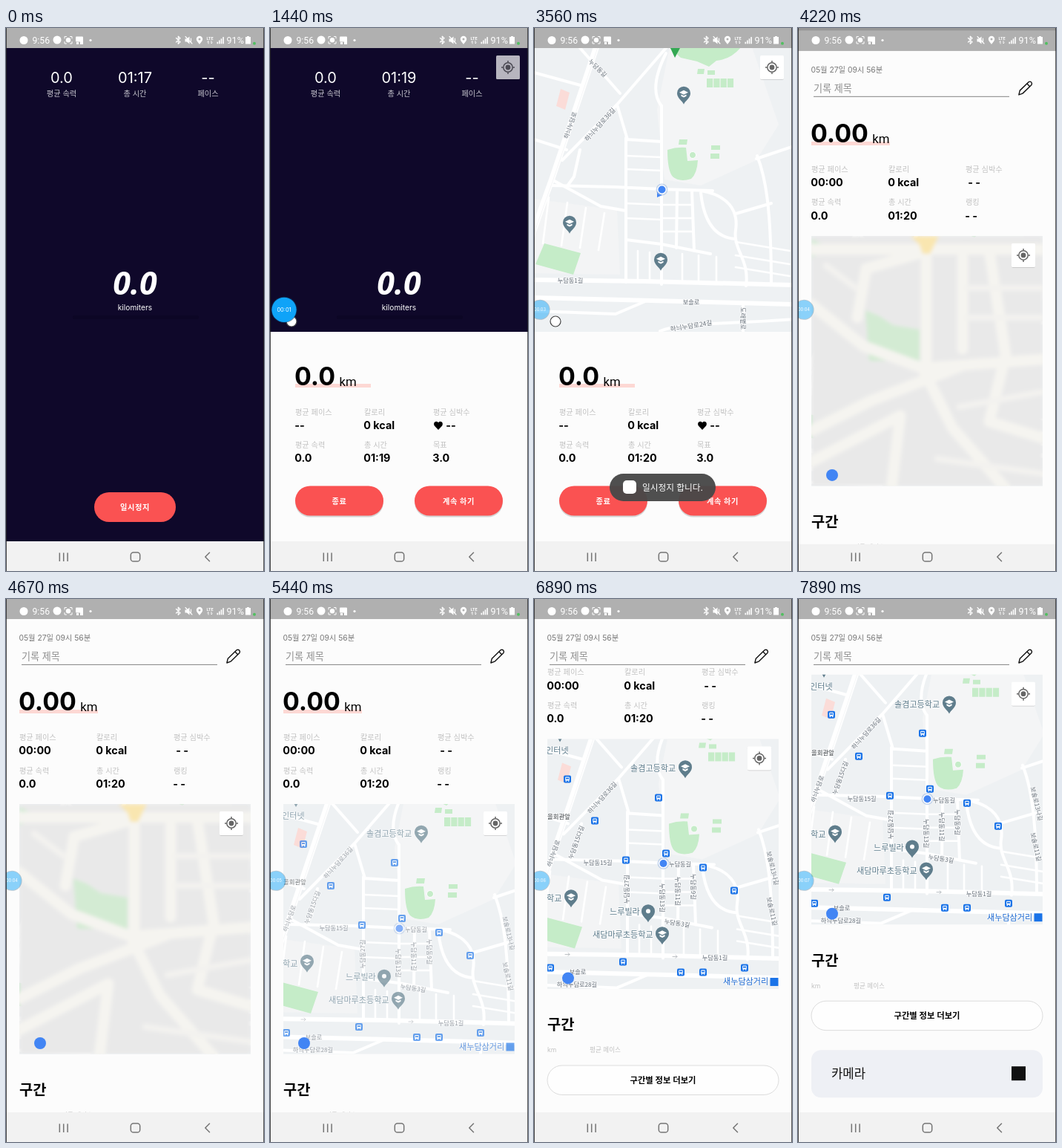
Recreate the animation shown at these times as an HTML page. Size 348 px wide and 731 px high, loop 8000 ms.

```html
<!DOCTYPE html>
<html lang="ko">
<head>
<meta charset="utf-8">
<title>Running tracker</title>
<style>
html, body { margin: 0; width: 100%; height: 100%; overflow: hidden; background: #fcfcfc; }
#stage { display: block; font-family: Inter, "Noto Sans CJK KR", "Noto Sans CJK", sans-serif; }
.sys { font-family: Roboto, sans-serif; }
.big { font-family: "Noto Sans", sans-serif; }
.map text { font-family: "Noto Sans CJK KR", "Noto Sans CJK", sans-serif; paint-order: stroke; stroke: #f8f9fa; stroke-width: 2px; stroke-linejoin: round; }
</style>
</head>
<body>
<svg id="stage" width="348" height="731" viewBox="0 0 348 731"></svg>
<script>
const LOOP = 8000;

const rect = (x, y, w, h, fill, rx = 0, more = '') =>
  `<rect x="${x}" y="${y}" width="${w}" height="${h}" rx="${rx}" fill="${fill}" ${more}/>`;
const dot = (x, y, r, fill, more = '') => `<circle cx="${x}" cy="${y}" r="${r}" fill="${fill}" ${more}/>`;
const line = (d, stroke, w, more = 'stroke-linecap="round"') =>
  `<path d="${d}" fill="none" stroke="${stroke}" stroke-width="${w}" stroke-linejoin="round" ${more}/>`;
const fill = (d, color) => `<path d="${d}" fill="${color}"/>`;
const text = (x, y, s, size, color, more = '') =>
  `<text x="${x}" y="${y}" font-size="${size}" fill="${color}" ${more}>${s}</text>`;
const mid = (x, y, s, size, color, more = '') => text(x, y, s, size, color, 'text-anchor="middle" ' + more);
const bold = 'font-weight="700"', semi = 'font-weight="600"', butt = 'stroke-linecap="butt"';

// label / value pair
const stat = (x, y, label, value, id = '', vx = x) =>
  text(x, y, label, 10.2, '#c2c2c2') +
  text(vx - .8, y + 19.3, value, 14.4, '#000', bold + (id && ` class="${id}"`));

const distance = (x, y, value, kx) =>
  text(x - 1, y, value, 33.9, '#000', bold) + text(kx, y + 1.3, 'km', 16.8, '#000', 'class="sys"');

const pill = (x, y, w, label) =>
  rect(x, y, w, 40, '#fa5252', 20) + mid(x + w / 2, y + 24, label, 10.2, '#fff', semi + ' letter-spacing=".6"');

const locate = (x, y, id) =>
  `<g id="${id}" transform="translate(${x} ${y})">` +
  rect(-16, -15.2, 32, 32, '#000', 2, 'opacity=".18"') + rect(-16, -16, 32, 32, '#fff', 1.5) +
  dot(0, 0, 6.2, 'none', 'stroke="#666" stroke-width="1.5"') + dot(0, 0, 3.4, '#666') +
  line('M0 -9V-6.5M0 9V6.5M-9 0H-6.5M9 0H6.5', '#666', 1.5, butt) + '</g>';

// ---- map ----
const GREEN = '#c5ecc8', SLATE = '#5f7d8c', STREET = '#69727b';

const alleys = [172, 190, 236, 256].map(y => `M124 ${y}L172 ${y + 2}`).join('') +
  [140, 156, 200, 222, 246].map((x, i) => `M${x} ${300 + i * 2}V342`).join('') +
  [20, 45, 70, 95].map((x, i) => `M${x} ${228 + i * 7}l-8 ${62 - i * 4}`).join('') +
  [238, 256, 274].map(y => `M174 ${y}H214`).join('') +
  [300, 318, 334].map(y => `M272 ${y - 12}L345 ${y}`).join('');

const base =
  rect(0, 20, 348, 400, '#eef1f3') +
  fill('M184 20L292 20L330 130L300 178L225 212L176 204L166 110Z', '#f4f5f6') +
  fill('M0 230L112 245L116 332L0 330Z', '#f3f4f5') +
  fill('M36 82L48 87L42 110L30 105Z', '#fbdcd8') +
  fill('M182 26H279Q266 42 246 44L236 52L220 45L198 40Z', GREEN) +
  fill('M180 164Q192 160 205 161L207 179L221 178Q220 196 212 203Q196 208 187 200Q180 192 180 164Z', GREEN) +
  dot(214, 171, 4.5, GREEN, 'stroke="#fff"') +
  fill('M196 150h11l-1 7h-11zM239 158h12v6h-12zM238 169h12v7h-12zM221 55h9l-1 7h-9zM234 57h10v6h-10z', GREEN) +
  [0, 1, 2, 3].map(i => rect(233 + i * 9.3, 68, 8.2, 12, GREEN)).join('') +
  fill('M14 290L63 303L53 332L2 318Z', GREEN) +
  line(alleys, '#fff', 2.6) +
  line('M56 20L116 88M38 178L112 103L184 20M112 103L126 150L172 153M24 212L110 214L172 217L241 219' +
    'M124 148V342M172 105V345M193 219L192 296M213 219L216 300M124 285L172 291L238 304', '#fff', 4) +
  line('M225 219C262 225 276 246 272 272S291 312 286 347M225 222C228 250 238 282 272 284M301 172C312 200 320 240 320 346' +
    'M272 250L320 236M300 176L348 160M282 370V410M170 408C200 396 240 400 350 392M0 381L110 385L150 368' +
    'M62 164L54 200L44 214M0 150L44 164M0 60L66 78M24 204L90 240L124 246M172 105C160 90 162 66 178 34', '#fff', 4) +
  line('M86 20L49 130L24 204L-5 285', '#fff', 8) +
  line('M-5 339L150 341L350 346M-5 363L120 366L350 372', '#fff', 6) +
  line('M88 20L51 130L26 204L-3 285', '#f3f4f5', .8);

const pin = (x, y, cap = true) => `<g transform="translate(${x} ${y + .7})">` +
  fill('M0 14C-2 9 -9 6 -9 -1A9 9 0 0 1 9 -1C9 6 2 9 0 14Z', SLATE) +
  (cap ? fill('M-6 -2L0 -5L6 -2L0 1ZM-3.5 .7L0 2.5L3.5 .7V3L0 4.8L-3.5 3Z', '#fff') : dot(0, -1, 3, '#fff')) + '</g>';
const pins = pin(202, 88) + pin(48, 262) + pin(171, 312);
const here = dot(172.5, 217.5, 8, '#9db8e0', 'opacity=".55"') + dot(172.5, 217.5, 6.4, '#fff') + dot(172.5, 217.5, 5, '#4285f4');
const road = (x, y, s, a = 0, size = 8.2) =>
  `<g transform="translate(${x} ${y}) rotate(${a})">${mid(0, 3, s, size, STREET)}</g>`;
const place = (x, y, s, color = SLATE) => text(x, y, s, 11.1, color);
const stop = ([x, y]) => `<g transform="translate(${x} ${y})">` + rect(-5, -5, 10, 10, '#1a73e8', 2) +
  rect(-2.8, -3, 5.6, 5, '#fff', 1) + rect(-2, -1.8, 4, 1.8, '#1a73e8') + fill('M-2.4 2h1.4v1.3h-1.4zM1 2h1.4v1.3h-1.4z', '#fff') + '</g>';

const marks1 = pins + fill('M190 40L184 27H197Z', '#34a853') + fill('M166 220L166 228L173 225Z', '#4285f4') + here +
  road(86, 54, '누담동길', 44) + road(49, 131, '하늬누담로', -71) + road(89, 130, '하늬누담로36길', -48, 8.6) +
  road(49, 340, '누담동1길') + road(212, 369, '보솔로') + road(212, 401, '하늬누담로24길', -9, 8.6) + road(282, 391, '도래볕로', 90);

const stops = [[43, 104], [80, 160], [166, 129], [122, 213], [176, 204], [226, 223], [268, 254], [118, 350],
  [20, 358], [196, 364], [226, 364], [282, 358]];
const marks2 = pins + pin(152, 282, false) + fill('M33 54L28 45H38Z', SLATE) + stops.map(stop).join('') + here +
  place(128, 94, '솔겸고등학교') + place(100, 287, '느루빌라') + place(77, 318, '새담마루초등학교') +
  place(15, 269, '학교') + place(14, 70, '인터넷') + text(16, 158, '을회관앞', 8.4, '#3c4043') +
  road(24, 204, '하늬누담로', -70) + road(90, 129, '하늬누담로36길', -48) + road(55, 189, '누담동15다길', -70) +
  road(84, 217, '누담동15길') + road(195, 219, '누담동길') + road(123, 252, '누담동27길', -90) +
  road(171, 264, '누담동13길', 90) + road(192, 255, '누담동11길', 90) + road(213, 249, '누담동9길', 90) +
  road(191, 298, '누담동3길', 9) + road(242, 345, '누담동1길') + road(57, 364, '보솔로') +
  road(56, 381, '하늬누담로28길') + road(320, 224, '보솔로13나길', 77) + road(319, 282, '보솔로11길', 77) +
  line('M40 340h6m-2 -2l2 2l-2 2M185 343h6m-2 -2l2 2l-2 2', '#aab0b5', .8) +
  place(253, 381, '새누담삼거리', '#1967d2') + rect(316.5, 371.5, 11, 11, '#1a73e8');

const coarse = rect(0, 0, 312, 337, '#e9e9e9') +
  fill('M73 100L92 108L110 120L146 126V168H78Z', '#d3ebd3') + fill('M0 4L20 14L0 30Z', '#d3ebd3') +
  line('M155 0V190M0 92L70 148L150 178L312 166M62 110L74 44L150 22M0 18H312M0 262L80 222L200 176' +
    'M150 178L190 258L262 340M204 30V152M0 304L120 242L108 340M262 160L240 250L312 272M240 20L262 160', '#f5f4f0', 15) +
  line('M210 70H312M210 110H312M20 40L60 70M170 300L312 320M200 230L312 210', '#f3f2ef', 8) +
  fill('M134 0H172L166 12L160 24H150L146 12Z', '#f9e6b0');

// ---- screens ----
const run = rect(0, 0, 348, 731, '#0f082a') +
  [[75, '0.0', '평균 속력', ''], [174, '01:17', '총 시간', 'class="clock"'], [272.5, '--', '페이스', '']]
    .map(([x, v, l, c]) => mid(x, 74, v, 20, '#fff', c) + mid(x, 91.5, l, 10.2, '#c9c8d0')).join('') +
  rect(90, 387, 170, 5, '#0a0522', 2, 'opacity=".6"') +
  mid(174, 359, '0.0', 43, '#fff', 'class="big" font-weight="800" font-style="italic"') +
  mid(174, 379.5, 'kilomiters', 10.2, '#fff') + pill(119, 625, 110, '일시정지');

const pause = `<svg class="map" id="map1" y="27" width="348" height="382" viewBox="0 27 348 382">${base}<g id="marks1">${marks1}</g></svg>` +
  dot(29, 395, 7, '#fff', 'stroke="#444" stroke-width="1.2"') + locate(321, 53, 'loc1') +
  rect(0, 409, 348, 290, '#fcfcfc') + rect(34, 479, 102, 5, '#fdd8d4') + distance(34, 481, '0.0', 93.5) +
  stat(34, 520.5, '평균 페이스', '--') + stat(127, 520.5, '칼로리', '0 kcal') + stat(220, 520.5, '평균 심박수', '--', '', 238) +
  fill('M227 541L221.8 535.4C219.5 532 223.5 527.5 227 531.3C230.5 527.5 234.5 532 232.2 535.4Z', '#000') +
  stat(34, 564.7, '평균 속력', '0.0') + stat(127, 564.7, '총 시간', '01:19', 'clock') + stat(220, 564.7, '목표', '3.0') +
  [34, 195].map(x => rect(x, 618, 119, 40.5, '#000', 20, 'opacity=".16"')).join('') +
  pill(34, 616.5, 119, '종료') + pill(195, 616.5, 119, '계속 하기');

const toast = rect(102, 600, 143, 37, '#484848', 18.5, 'opacity=".96"') + rect(120, 609, 18, 18, '#fff', 5) +
  text(146, 622.5, '일시정지 합니다.', 11.7, '#fff');

const record = rect(0, 0, 348, 731, '#fcfcfc') + '<g id="scroll">' +
  rect(18, 149, 106, 5, '#fdd8d4') + distance(18, 150, '0.00', 100.2) +
  stat(18, 190, '평균 페이스', '00:00') + stat(122, 190, '칼로리', '0 kcal') + stat(226, 190, '평균 심박수', '- -', '', 230) +
  stat(18, 234.5, '평균 속력', '0.0') + stat(122, 234.5, '총 시간', '01:20') + stat(226, 234.5, '랭킹', '- -') +
  `<svg class="map" x="18" y="276" width="312" height="336.5"><g transform="translate(-16 -50)">${base}<g id="marks2">${marks2}</g></g>` +
  `<g id="coarse" filter="url(#soft)">${coarse}</g></svg>` +
  dot(46, 598, 8, '#4285f4') + locate(304, 302, 'loc2') +
  text(18, 668, '구간', 19.8, '#000', bold) + text(18, 698, 'km', 8.6, '#c2c2c2') + text(75, 698, '평균 페이스', 8.6, '#c2c2c2') +
  rect(18, 715.5, 312, 39.5, '#fefefe', 20, 'stroke="#d8d8d8" stroke-width=".9"') +
  mid(174, 739.3, '구간별 정보 더보기', 11.3, '#000', semi) +
  rect(18, 781.5, 312, 64, '#eef0f5', 13) + text(45, 819, '카메라', 16.7, '#111', 'font-weight="500"') +
  rect(288, 803.5, 19, 19, '#111') + '</g>' +
  rect(0, 0, 348, 90, '#fcfcfc') + rect(0, 0, 348, 27, '#b0b0b0') +
  text(17.5, 55.8, '05월 27일 09시 56분', 10.3, '#777') + text(21, 82, '기록 제목', 13.1, '#8f8f8f') +
  line('M21 88.4H285', '#777', .9, butt) +
  line('M297.9 86L299.3 80.2L311.3 68.6Q313.2 67.5 314.8 69.2Q316.2 71 314.8 72.8L303 84.2ZM309 71L312.4 74.6', '#111', 1.4) +
  rect(0, 691, 348, 40, '#f2f2f2');

const status =
  dot(24, 16.5, 5.5, '#fff') + text(35.5, 20.7, '9:56', 12.2, '#fff', 'class="sys"') + dot(69, 16, 5.5, '#fff') +
  line('M79 14V11.5H81.5M86.5 11.5H89V14M89 18.5V21H86.5M81.5 21H79V18.5', '#fff', 1) + dot(84, 16.2, 3.2, '#fff') +
  rect(94, 11.5, 10, 7, '#fff', 1) + fill('M95 19h3v3h-3zM100 17h4v5h-4z', '#fff') + dot(114, 16.5, 1.6, '#fff') +
  line('M229.5 13.5L235 18.8L232.3 21.4V11.2L235 13.8L229.5 19', '#fff', 1.2) +
  fill('M241.5 14.5h2.5l3.5 -3v10l-3.5 -3h-2.5z', '#fff') + line('M242 11.5L251 21M249.5 14v4', '#fff', 1.1) +
  fill('M261 22C259 19 256.8 17.5 256.8 15A4.2 4.2 0 0 1 265.2 15C265.2 17.5 263 19 261 22Z', '#fff') + dot(261, 15, 1.5, '#b0b0b0') +
  mid(275, 15.6, 'LTE', 5.6, '#fff', 'class="sys" font-weight="700"') + line('M273 21V17.5l-1.2 1.2M277 17.5V21l1.2 -1.2', '#fff', .9) +
  [0, 1, 2, 3].map(i => rect(284.5 + i * 2.6, 18.7 - i * 2.2, 1.6, 2.6 + i * 2.2, '#fff')).join('') +
  text(297.5, 20.7, '91%', 12.6, '#fff', 'class="sys"') + fill('M325 11h3v1h2v9.5h-7V12h2z', '#fff') + dot(335, 20.7, 2, '#4fbf5f');

const nav = line('M72.3 706.5V718M77.7 706.5V718M83.1 706.5V718', '#757575', 1.5, butt) +
  rect(168.3, 706, 12.4, 12, 'none', 3.6, 'stroke="#757575" stroke-width="1.5"') + line('M274.5 706.2L268.8 712L274.5 717.8', '#757575', 1.5);

const stage = document.getElementById('stage');
stage.innerHTML =
  '<defs><filter id="soft" x="0" y="0" width="1" height="1"><feGaussianBlur stdDeviation="2.4"/></filter></defs>' +
  `${run}<g id="pause">${pause}</g>` + rect(0, 0, 348, 27, '#b0b0b0') + rect(0, 691, 348, 40, '#f2f2f2') +
  `<rect id="dim" width="348" height="731"/><g id="record">${record}</g><g id="toast">${toast}</g>${status}${nav}` +
  `<g id="bubble">${dot(0, 0, 17.6, '#0c3f66', 'opacity=".6"')}${dot(0, 0, 16.6, '#0fa3f8')}${mid(0, 2.6, '00:00', 7.4, '#fff', 'id="secs"')}</g>` +
  rect(0, 0, .8, 731, '#222') + rect(347.3, 0, .7, 731, '#222');

const el = {};
stage.querySelectorAll('[id]').forEach(e => el[e.id] = e);
const clocks = stage.querySelectorAll('.clock');

const ramp = (t, a, b) => Math.min(1, Math.max(0, (t - a) / (b - a)));
const ease = p => p * p * (3 - 2 * p);
const fade = (e, v) => { e.style.display = v > 0 ? '' : 'none'; e.setAttribute('opacity', v); };
const move = (e, x, y, k = 1) => e.setAttribute('transform', `translate(${x} ${y}) scale(${k})`);

function draw(t) {
  const time = '01:' + (17 + [220, 1110, 2000].filter(s => t >= s).length);
  clocks.forEach(c => c.textContent = time);

  fade(el.pause, t >= 1220 ? 1 : 0);
  fade(el.map1, ramp(t, 1830, 2110));
  fade(el.marks1, ramp(t, 2280, 2670));
  fade(el.loc1, .7 + .3 * ramp(t, 1830, 2110));
  fade(el.toast, Math.min(ramp(t, 1890, 2110), 1 - ramp(t, 3830, 4050)));

  fade(el.dim, .14 * ramp(t, 3890, 4110));
  fade(el.record, ramp(t, 3880, 4110));
  move(el.record, 0, 64 * (1 - ramp(t, 3890, 4330)) ** 2);
  fade(el.coarse, 1 - ramp(t, 4670, 5330));
  fade(el.marks2, ramp(t, 5000, 5670));
  move(el.scroll, 0, -174.3 * ease(ramp(t, 6550, 7230)));

  const dock = ease(ramp(t, 2890, 3200));
  fade(el.bubble, ramp(t, 110, 330) * (1 - .52 * dock));
  move(el.bubble, 19 - 11 * dock, 379.3, 1 - .23 * dock);
  el.secs.textContent = '00:0' + Math.floor(t / 1000);
}

function tick() {
  draw(performance.now() % LOOP);
  requestAnimationFrame(tick);
}
tick();
</script>
</body>
</html>
```
